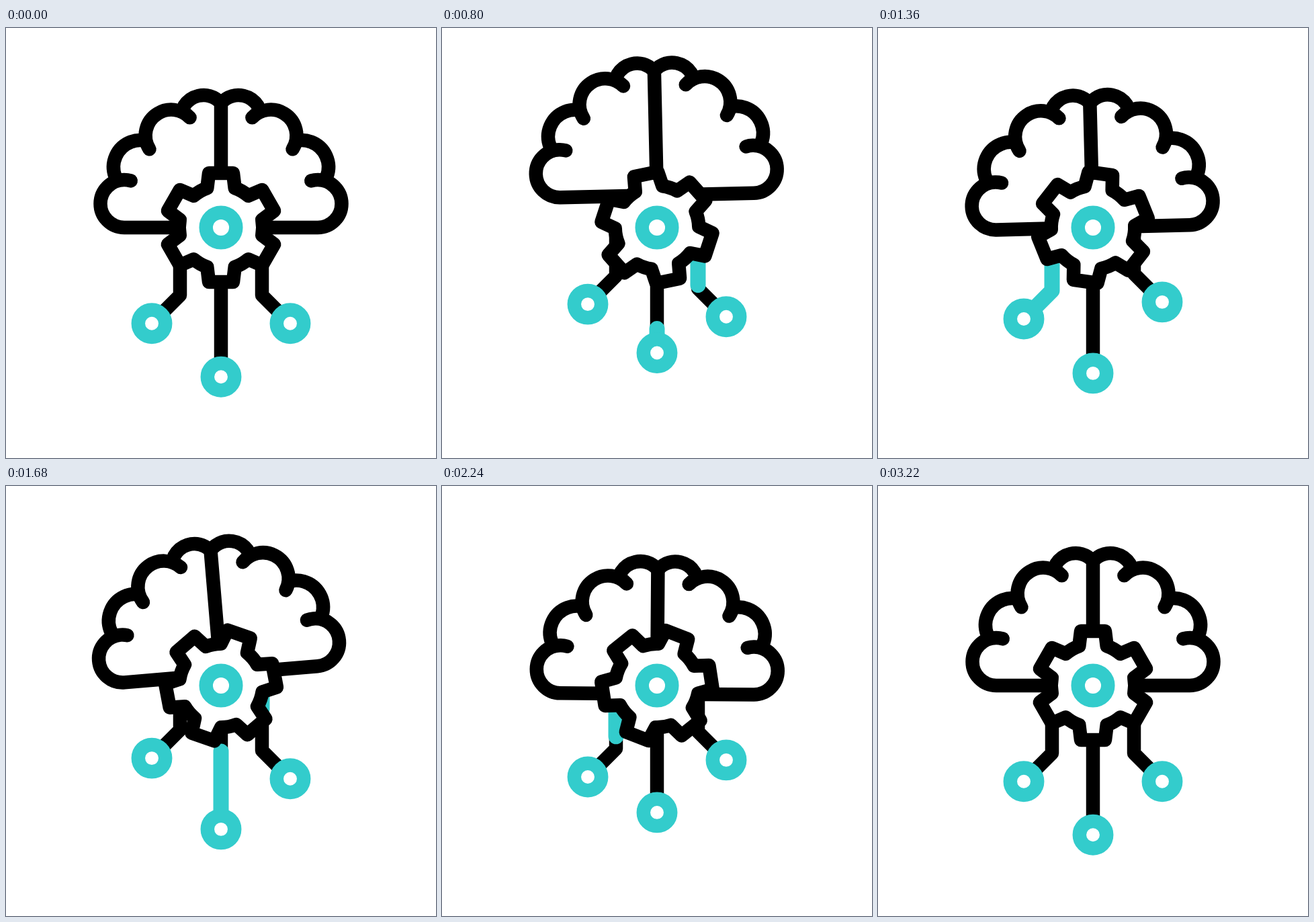
Write an HTML page with a canvas that moves like this. It is 640x640 px and loops after 3.6 s.

```html
<!DOCTYPE html>
<html lang="en">
<head>
<meta charset="utf-8">
<title>Brain and gear</title>
<style>
  html, body { margin: 0; width: 100%; height: 100%; overflow: hidden; background: #fff; }
  canvas { display: block; width: 640px; height: 640px; }
</style>
</head>
<body>
<canvas id="stage" width="640" height="640"></canvas>
<script>
const ctx = document.getElementById('stage').getContext('2d');
const CYAN = '#33cccc', BLACK = '#000', WHITE = '#fff';
const LOOP = 3600, STEP = 20, LAST = 3220;
const CX = 320, CY = 297, LINE = 20.5;
const rad = d => d * Math.PI / 180;
const clamp = p => Math.min(1, Math.max(0, p));
const smooth = p => (p = clamp(p), p * p * (3 - 2 * p));

// [time, value] steps, eased between neighbours
const TILT = [[0, 0], [500, -14.8], [1040, 8.4], [1560, -6.3], [2040, 3.2], [2300, 0]];
const RISE = [[0, 0], [680, -52], [1385, 0], [1880, -26], [2240, 12.4], [2560, 0]];
const TURN = [[0, 0], [540, -15], [2020, 24.6], [2980, 0]];

// lobes of the left half: centre, radius, start and end angle
const LOBES = [
  [200, 207, 40, 159, 276],
  [246, 160, 38.4, 148, 316],
  [294, 134, 34, 212, 320]
];

// wires: elbow x, node x, node y, lift delay, pulse head and tail start
const WIRES = [
  { x: 259, nx: 217, ny: 439.7, delay: 0, head: 5, tail: 220 },
  { x: 320, nx: 320, ny: 519.2, delay: 300, head: 261, tail: 456 },
  { x: 381, nx: 423, ny: 439.7, delay: 600, head: 540, tail: 762 }
];
const WIRE_TOP = 300, PULSE = 480, PULSE_GAP = 1000;

function track(keys, t) {
  for (let i = 1; i < keys.length; i++) {
    const [t0, a] = keys[i - 1], [t1, b] = keys[i];
    if (t < t1) return a + (b - a) * smooth((t - t0) / (t1 - t0));
  }
  return keys[keys.length - 1][1];
}

function lift(t, delay) {
  const u = t - delay;
  if (u < 0 || u > 2400) return 0;
  return 38.6 * smooth(1 - Math.abs(u % 1200 - 600) / 600);
}

function stroke(color, width) {
  ctx.strokeStyle = color;
  ctx.lineWidth = width;
  ctx.stroke();
}

function ring(x, y, r) {
  ctx.beginPath();
  ctx.arc(x, y, r, 0, 2 * Math.PI);
  ctx.fillStyle = WHITE;
  ctx.fill();
  stroke(CYAN, LINE);
}

function halfBrain() {
  ctx.beginPath();
  ctx.moveTo(0, 0);
  ctx.arc(176 - CX, 261.5 - CY, 35.5, rad(90), rad(286));
  stroke(BLACK, LINE);
  for (const [x, y, r, a, b] of LOBES) {
    ctx.beginPath();
    ctx.arc(x - CX, y - CY, r, rad(a), rad(b));
    stroke(BLACK, LINE);
  }
}

function brain(t) {
  ctx.save();
  ctx.translate(CX, CY + track(RISE, t));
  ctx.rotate(rad(track(TILT, t)));
  halfBrain();
  ctx.scale(-1, 1);
  halfBrain();
  ctx.beginPath();
  ctx.moveTo(0, 0);
  ctx.lineTo(0, 112 - CY);
  stroke(BLACK, LINE);
  ctx.restore();
}

function wire(w, t) {
  const y = w.ny - lift(t, w.delay);
  const side = Math.abs(w.nx - w.x);
  const bend = y - side;
  const length = bend - WIRE_TOP + side * Math.SQRT2;
  ctx.beginPath();
  ctx.moveTo(w.x, WIRE_TOP);
  ctx.lineTo(w.x, bend);
  if (side) ctx.lineTo(w.nx, y);
  stroke(BLACK, LINE);

  for (let i = 0; i < 3; i++) {
    const u = t - i * PULSE_GAP;
    const from = length * smooth((u - w.tail) / PULSE);
    const to = length * smooth((u - w.head) / PULSE);
    if (to <= from) continue;
    ctx.setLineDash([to - from, 2 * length]);
    ctx.lineDashOffset = -from;
    stroke(CYAN, 23);
    ctx.setLineDash([]);
  }
  ring(w.nx, y, 20.2);
}

function gear(t) {
  ctx.save();
  ctx.translate(CX, CY);
  ctx.rotate(rad(track(TURN, t)));
  ctx.beginPath();
  for (let i = 0; i < 6; i++) {
    const mid = i * 60 - 90;
    for (const side of [-12.5, 12.5]) {
      const a = rad(mid + side);
      ctx.lineTo(83 * Math.cos(a), 83 * Math.sin(a));
    }
    ctx.arc(0, 0, 62.3, rad(mid + 19.4), rad(mid + 40.6));
  }
  ctx.closePath();
  ctx.fillStyle = WHITE;
  ctx.fill();
  stroke(BLACK, LINE);
  ctx.restore();
  ring(CX, CY, 22.3);
}

function draw(t) {
  ctx.fillStyle = WHITE;
  ctx.fillRect(0, 0, 640, 640);
  ctx.lineCap = ctx.lineJoin = 'round';
  brain(t);
  for (const w of WIRES) wire(w, t);
  gear(t);
}

const start = performance.now();
function tick() {
  const t = (performance.now() - start) % LOOP;
  const shown = Math.floor(t / STEP) * STEP;
  draw(shown >= LAST ? LOOP : shown);
  requestAnimationFrame(tick);
}
tick();
</script>
</body>
</html>
```
